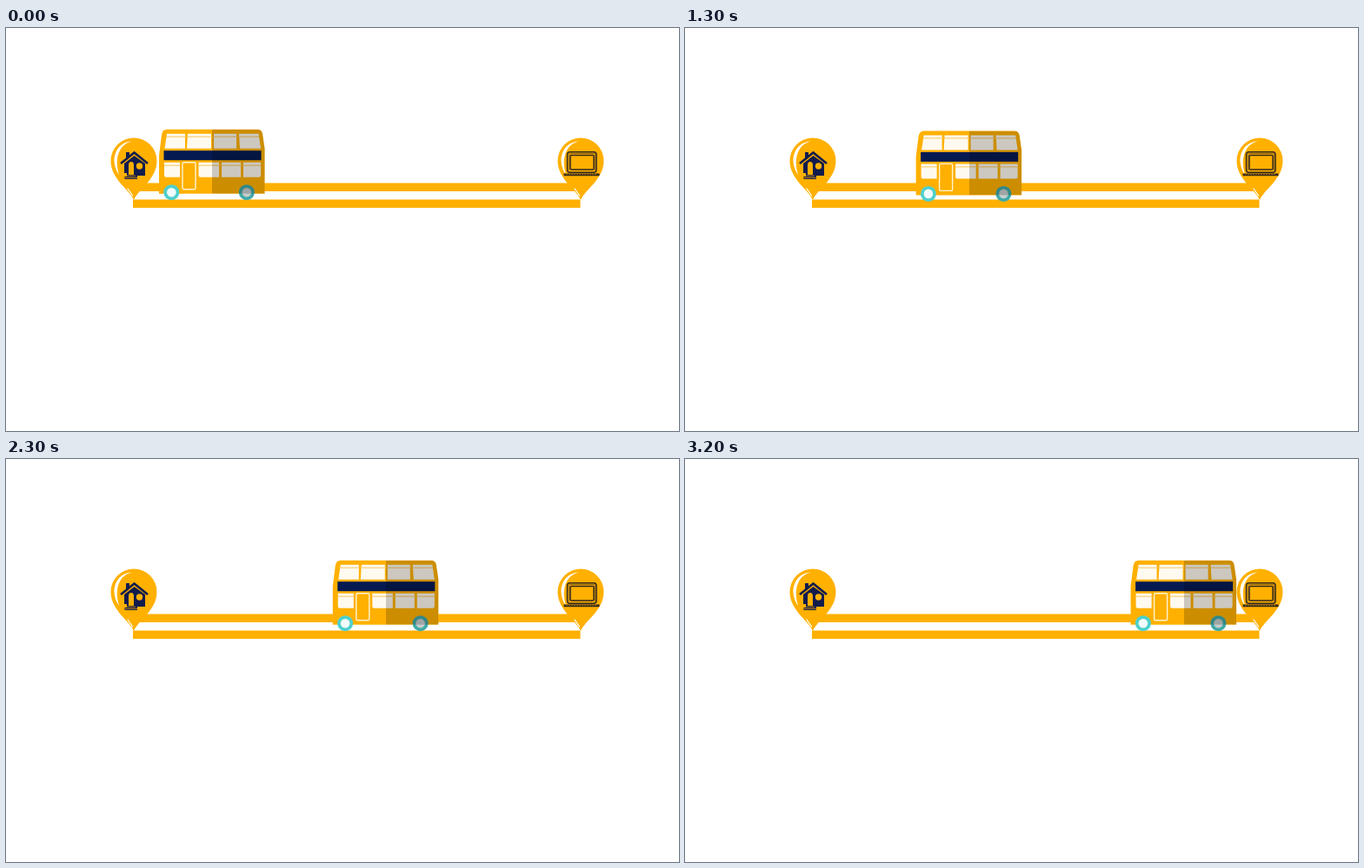
These frames come from a looping animation (774x464 px, 3300 ms). An HTML page:

```html
<!DOCTYPE html>
<html lang="en">
<head>
<meta charset="utf-8">
<title>Bus ride</title>
<style>
  html, body { margin: 0; width: 100%; height: 100%; overflow: hidden; background: #fff; }
  svg { display: block; width: 774px; height: 464px; filter: blur(0.4px); }
</style>
</head>
<body>
<svg viewBox="0 0 774 464">
  <defs>
    <g id="pin">
      <path d="M0 198C-5 186-26.5 174-26.5 153A26.5 26.5 0 0 1 26.5 153C26.5 174 5 186 0 198Z" fill="#ffb000"/>
      <path d="M-2 130.5C-15 131-23 141-22.5 154C-22 160-20 165-17 169C-20 159-20 150-17 143C-14 136-9 132-2 130.5Z" fill="#fff"/>
      <path d="M-7 185L-1.500 193" stroke="#fff" stroke-width="1.300" stroke-linecap="round"/>
    </g>
    <!-- upper-deck and lower-deck panes, each with a blind line -->
    <g id="panes">
      <path d="M9 5H30V22H6.500ZM33 5H60V22H32ZM63 5H89V22H63ZM92 5H114.500L117 22H93Z" fill="#fffaf0"/>
      <path d="M6 38H24V55H8Q6 55 6 53ZM45.500 38H69V55H47.500Q45.500 55 45.500 53ZM72 38H94V55H72ZM97 38H117V53Q117 55 115 55H97Z" fill="#fffaf0"/>
      <path d="M8 8.500H115M6 41.500H24M45.500 41.500H117" stroke="#f7c75c" stroke-width="1"/>
    </g>
    <g id="wheel">
      <circle r="9" fill="#4fd0cc"/>
      <circle r="5.300" fill="#f2fbfb"/>
    </g>
    <clipPath id="rear"><path d="M61 0H113Q118 0 119 5L121.500 22V74H110A9.200 9.200 0 0 1 92 74H61Z"/></clipPath>
  </defs>

  <path d="M146 183.300H660M146 202.300H660.500" stroke="#ffb000" stroke-width="9.500"/>

  <use href="#pin" x="147"/>
  <g fill="#111c4c">
    <path d="M132 156L147.500 143.500L163 156" fill="none" stroke="#111c4c" stroke-width="2.600"/>
    <path d="M138 143H142V148L138 151ZM136 156L147.500 147L160 156V170H151V174H136.500V171H139V167H136Z"/>
    <path d="M141 169V158Q141 154 144 154T147 158V169Z" fill="#ffb000"/>
    <circle cx="153.500" cy="159" r="3.700" fill="#ffb000"/>
    <path d="M139 170.300H149M137 172.500H151" stroke="#ffb000" stroke-width=".7"/>
  </g>

  <use href="#pin" x="661"/>
  <g fill="none" stroke="#33291f" stroke-width="1.500">
    <rect x="645.500" y="142.700" width="33.500" height="23.500" rx="3"/>
    <rect x="649" y="146.500" width="27" height="16.500" rx="1"/>
    <path d="M647.300 164V146Q647.300 144.500 649 144.500H676Q677.600 144.500 677.600 146V164" stroke-width=".5"/>
    <path d="M641.500 168.800H682.500" stroke-width="2.800"/>
    <path d="M644 168.500H680" stroke="#c98c10" stroke-width=".6" stroke-dasharray="2 1"/>
  </g>

  <g id="bus">
    <path d="M9 0H113Q118 0 119 5L121.500 22V74H0V30L3 6Q4 0 9 0Z" fill="#ffb000"/>
    <use href="#panes"/>
    <rect x="5.500" y="24.500" width="112" height="11" fill="#061a52"/>
    <rect x="27" y="38" width="15" height="31" rx="1.500" fill="#ffb000" stroke="#fff3d2" stroke-width="1.400"/>
    <use href="#wheel" x="14.300" y="72.500"/>
    <use href="#wheel" x="100.800" y="72.500"/>
    <rect x="61" width="61" height="74" fill="#000" fill-opacity=".2" clip-path="url(#rear)"/>
    <circle cx="100.800" cy="72.500" r="9" fill="#000" fill-opacity=".18"/>
  </g>
</svg>
<script>
  const LOOP = 3300, STEP = 100;
  // step, left edge, speed in pixels per step
  const route = [
    [0, 176, 3.5], [8, 217.800, 7.8], [13, 265.600, 10.2], [17, 309, 11],
    [23, 375.800, 12.2], [27, 428.700, 15], [32, 512.600, 18.5]
  ];
  const bus = document.getElementById("bus");

  function busX(n) {
    let i = 0;
    while (i < route.length - 2 && n >= route[i + 1][0]) i++;
    const [n0, x0, v0] = route[i], [n1, x1, v1] = route[i + 1];
    const d = n1 - n0, u = (n - n0) / d, w = 1 - u;
    return w * w * ((1 + 2 * u) * x0 + u * d * v0) + u * u * ((3 - 2 * u) * x1 - w * d * v1);
  }

  function busY(n) {
    const wave = (1 - Math.cos(n * 0.182 * 2 * Math.PI)) / 2;
    const k = Math.min(1, Math.max(0, (wave - 0.3) / 0.5));
    return 116.700 + 1.700 * k * k * (3 - 2 * k);
  }

  function draw(now) {
    const n = Math.floor((now % LOOP) / STEP);
    bus.setAttribute("transform", `translate(${busX(n).toFixed(2)} ${busY(n).toFixed(2)})`);
    requestAnimationFrame(draw);
  }
  draw(performance.now());
</script>
</body>
</html>
```
